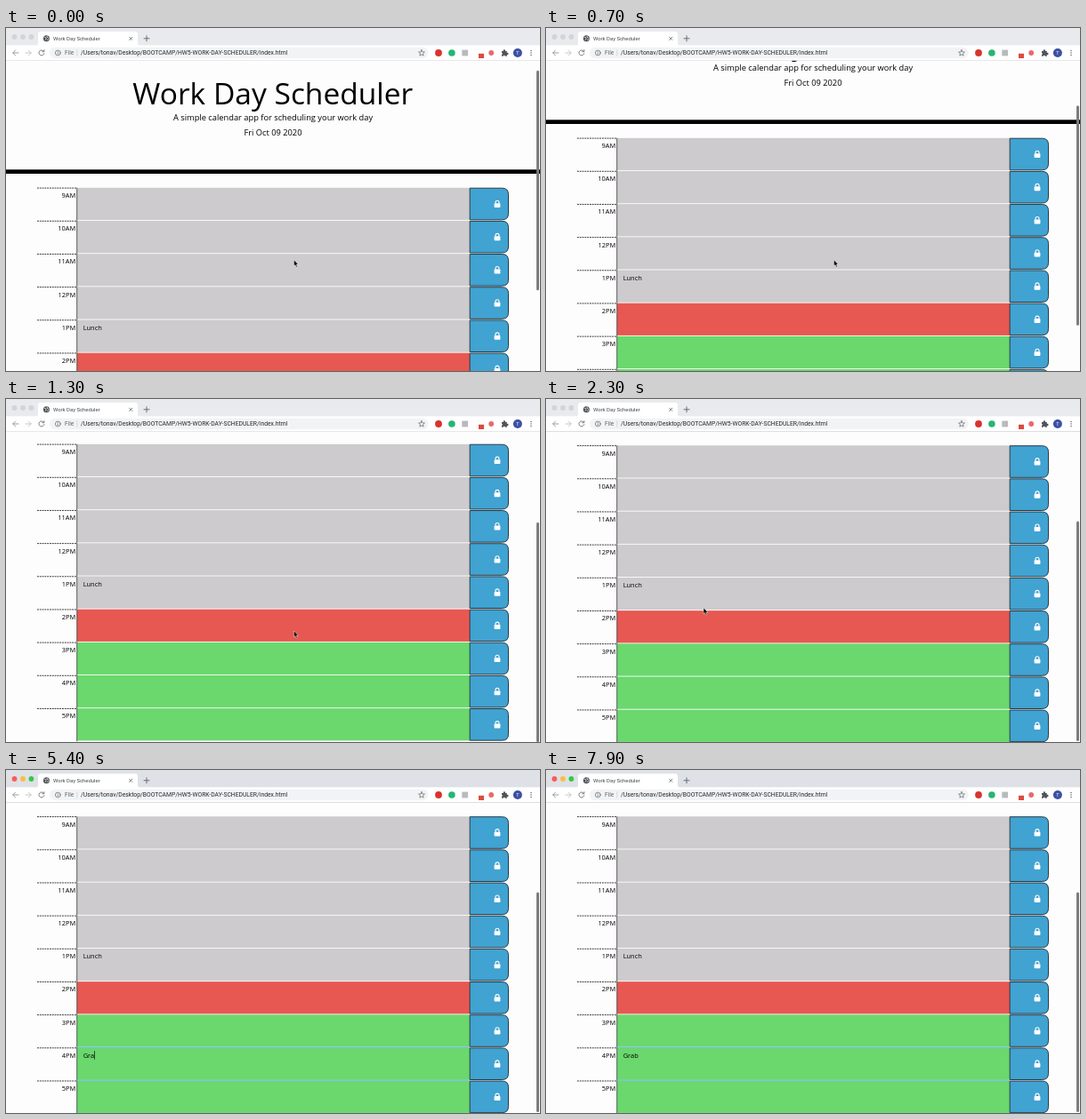
Animation, 600 px wide and 386 px high, one loop 8000 ms. Source, as an HTML page:

```html
<!DOCTYPE html>
<html lang="en">
<head>
<meta charset="utf-8">
<title>Work Day Scheduler</title>
<style>
  html, body { margin: 0; width: 100%; height: 100%; overflow: hidden; background: #fefdfe; }
  svg { display: block; width: 600px; height: 386px; }
  text { white-space: pre; }
  .page text { font-family: "Open Sans", "Noto Sans", sans-serif; fill: #000; }
  .chrome text { font-family: Roboto, Inter, sans-serif; }
  .entry { font-size: 7.44px; }
  .line { fill: none; stroke-linecap: round; stroke-linejoin: round; }
</style>
</head>
<body>
<svg viewBox="0 0 600 386">
  <defs>
    <g id="lock">
      <rect x="-3.4" y="-1.2" width="6.8" height="4.9" rx=".8" fill="#fff"/>
      <path d="M-2 -1V-2.2a2 2 0 0 1 4 0V-1" fill="none" stroke="#fff" stroke-width="1.15"/>
    </g>
  </defs>

  <g class="page">
    <g id="page">
      <g text-anchor="middle">
        <text x="299.8" y="85.7" font-size="33.5">Work Day Scheduler</text>
        <text x="300" y="104" font-size="9.3">A simple calendar app for scheduling your work day</text>
        <text x="300" y="120.8" font-size="9.3">Fri Oct 09 2020</text>
      </g>
      <rect y="159.3" width="600" height="4.7"/>
      <g id="rows"></g>
      <g id="focus" fill="none" stroke="#55aee0" stroke-width="1"></g>
      <text id="typed" class="entry" x="86.7"></text>
      <rect id="caret" width=".7" height="9.6" fill="#111"/>
    </g>
    <rect id="thumb" x="596" width="3" height="247.5" rx="1.5" fill="#7c7b7d"/>
  </g>

  <g class="chrome">
    <rect id="strip" width="600" height="20"/>
    <path d="M33 20q3 0 3-3V7q0-3 3-3h106q3 0 3 3v10q0 3 3 3z" fill="#fff"/>
    <rect y="19.4" width="600" height="17.4" fill="#fff"/>
    <rect y="36.3" width="600" height=".6" fill="#d9dadd"/>
    <g id="lights">
      <circle cx="9.5" cy="10"  r="2.9"/>
      <circle cx="19" cy="10" r="2.9"/>
      <circle cx="28.4" cy="10" r="2.9"/>
    </g>
    <circle cx="45.4" cy="11.8" r="3.5" fill="#4a4d51"/>
    <path d="M43 10.2l1.7 .5 .5 1.4-1 1.5M46.2 9l-.2 1.3 1.8 .9M46.5 13.5l1.2-.7" class="line" stroke="#fff" stroke-width=".7"/>
    <text x="53" y="13.8" font-size="5.95" fill="#45484d">Work Day Scheduler</text>
    <g class="line" stroke="#5f6368" stroke-width=".8">
      <path d="M138.6 10.2l3.2 3.2m0-3.2l-3.2 3.2"/>
      <path d="M155 11.8h6m-3-3v6" stroke-width=".9"/>
    </g>

    <rect x="49" y="21.8" width="425.5" height="12.4" rx="6.2" fill="#f1f3f4"/>
    <g class="line" stroke-width=".95">
      <path d="M14 28H7.8m2.8-2.9L7.7 28l2.9 2.9" stroke="#94979b"/>
      <path d="M22 28h6.2m-2.8-2.9l2.9 2.9-2.9 2.9" stroke="#c3c5c8"/>
      <path d="M42.3 26a3 3 0 1 0 .6 2.6M42.9 24.7v2h-2" stroke="#74777c"/>
      <circle cx="58.3" cy="28" r="2.9" stroke="#5f6368" stroke-width=".7"/>
      <path d="M58.3 27.9v1.5m0-2.9v.1" stroke="#5f6368" stroke-width=".75"/>
      <path d="M79.8 24.8v6.4" stroke="#c5c7ca" stroke-width=".6"/>
      <path id="star" stroke="#5f6368" stroke-width=".7"/>
    </g>
    <text x="66" y="30.4" font-size="6.6" fill="#63676c">File</text>
    <text x="84" y="30.4" font-size="6.78" fill="#25282c">/Users/tonav/Desktop/BOOTCAMP/HW5-WORK-DAY-SCHEDULER/index.html</text>

    <circle cx="486" cy="28" r="3.9" fill="#d8342f"/>
    <circle cx="500.9" cy="28" r="3.8" fill="#25b673"/>
    <rect x="512.3" y="24.6" width="6.8" height="6.8" fill="#b9babc"/>
    <rect x="531" y="28.8" width="6" height="5.2" fill="#dc4a3c"/>
    <circle cx="545.2" cy="28" r="2.9" fill="#e9696b"/>
    <path d="M557 26h1.8a1.2 1.2 0 1 1 2.2 0h1.8v1.9a1.2 1.2 0 1 1 0 2.2v1.7h-1.9a1.1 1.1 0 0 0-2.2 0H557v-1.9a1.1 1.1 0 0 0 0-2.1z" fill="#505358"/>
    <circle cx="574.9" cy="28" r="5" fill="#3c4fa5"/>
    <text x="574.9" y="30" font-size="5.4" fill="#fff" text-anchor="middle">T</text>
    <g fill="#5f6368">
      <circle cx="590" cy="25.6" r=".75"/><circle cx="590" cy="28" r=".75"/><circle cx="590" cy="30.4" r=".75"/>
    </g>
  </g>

  <path id="arrow" d="M0 0V6.8L1.5 5.5 2.6 8 3.8 7.5 2.8 5.1H4.8Z" stroke="#fff" stroke-width=".45"/>
  <path id="beam" class="line" d="M-1.3-3.5Q0-3.5 0-2.5V2.5Q0 3.5-1.3 3.5M1.3-3.5Q0-3.5 0-2.5M0 2.5Q0 3.5 1.3 3.5M-.8 .8H.8" stroke="#222" stroke-width=".8"/>
</svg>

<script>
const LOOP = 8000, STEP = 100, BLINK = 500;
const TOP = 179.8, PITCH = 37.17, FOCUS_ROW = 7, FOCUS_AT = 3200, HIDE_AT = 4700;
const GRAY = '#cdcbcd', RED = '#e75852', GREEN = '#6ad86d', BLUE = '#40a3d2';
const HOURS = ['9AM', '10AM', '11AM', '12PM', '1PM', '2PM', '3PM', '4PM', '5PM'];

const SCROLL = [[0, 0], [200, 5], [400, 20], [700, 56], [1000, 103], [1200, 127], [1300, 129], [1700, 127.5]];
const MOUSE = [[1900, 323.5, 261], [2100, 262, 247], [2300, 177, 235], [2600, 150, 268], [3000, 130, 318], [3200, 128.5, 326]];
const KEYS = [[FOCUS_AT, ''], [4800, 'G'], [5100, 'Gr'], [5300, 'Gra'], [5600, 'Grab'], [6000, 'Grab ']];

const el = id => document.getElementById(id);
const rowTop = i => TOP + i * PITCH;
const set = (id, attrs) => {
  for (const key in attrs) el(id).setAttribute(key, attrs[key]);
};
const show = (id, on) => { el(id).style.display = on ? '' : 'none'; };

// Linear value of one column of a [time, ...values] table.
function at(table, t, col = 1) {
  const next = table.findIndex(row => row[0] > t);
  if (next === 0) return table[0][col];
  if (next < 0) return table[table.length - 1][col];
  const a = table[next - 1], b = table[next];
  return a[col] + (b[col] - a[col]) * (t - a[0]) / (b[0] - a[0]);
}

function rowMarkup(hour, i) {
  const y = rowTop(i);
  const fill = i < 5 ? GRAY : i === 5 ? RED : GREEN;
  const note = hour === '1PM' ? `<text class="entry" x="86.7" y="${y + 11.2}">Lunch</text>` : '';
  return `
    <path d="M35 ${y + .3}H79.5" stroke="#222" stroke-width=".9" stroke-dasharray="1.9 .9"/>
    <text class="entry" x="78.3" y="${y + 11.2}" text-anchor="end">${hour}</text>
    <rect x="80" y="${y}" width="441" height="${PITCH - .9}" fill="${fill}"/>
    <path d="M79.7 ${y}v${PITCH}" stroke="#333" stroke-width=".8"/>
    <path d="M521.2 ${y + .4}h36.3q7 0 7 7v21.6q0 7-7 7h-36.3z" fill="${BLUE}" stroke="#1c2a33" stroke-width=".9"/>
    <use href="#lock" x="552" y="${y + 18.6}"/>${note}`;
}

function starPath(cx, cy, r) {
  const points = Array.from({ length: 10 }, (_, i) => {
    const angle = i * Math.PI / 5 - Math.PI / 2, size = i % 2 ? r * .45 : r;
    return `${cx + size * Math.cos(angle)} ${cy + size * Math.sin(angle)}`;
  });
  return `M${points.join('L')}Z`;
}

function build() {
  el('rows').innerHTML = HOURS.map(rowMarkup).join('');
  const y = rowTop(FOCUS_ROW);
  el('focus').innerHTML = `<path d="M80 ${y - .3}H521M80 ${y + PITCH - .5}H521"/>`;
  set('typed', { y: y + 11.2 });
  set('caret', { y: y + 3.6 });
  set('star', { d: starPath(467, 28.2, 3.6) });
}

function draw(t) {
  const scroll = at(SCROLL, t);
  set('page', { transform: `translate(0 ${-scroll})` });
  set('thumb', { y: 47.7 + scroll * .705 });

  const active = t >= FOCUS_AT;
  set('strip', { fill: active ? '#dee1e6' : '#e8eaed' });
  ['#fc5b57', '#fdbc40', '#34c84a'].forEach((color, i) =>
    el('lights').children[i].setAttribute('fill', active ? color : '#d2d4d7'));
  show('focus', active);

  const key = KEYS.filter(k => k[0] <= t).pop();
  el('typed').textContent = key ? key[1] : '';
  show('caret', key && (t - key[0]) % (2 * BLINK) < BLINK);
  set('caret', { x: 86.7 + (key && key[1] ? el('typed').getComputedTextLength() : 0) });

  const spot = { transform: `translate(${at(MOUSE, t, 1)} ${at(MOUSE, t, 2)})` };
  set('arrow', spot);
  set('beam', spot);
  show('arrow', !active);
  show('beam', active && t < HIDE_AT);
}

build();
const start = performance.now();
function tick() {
  const t = (performance.now() - start) % LOOP;
  draw(Math.floor(t / STEP) * STEP);
  requestAnimationFrame(tick);
}
tick();
</script>
</body>
</html>
```
